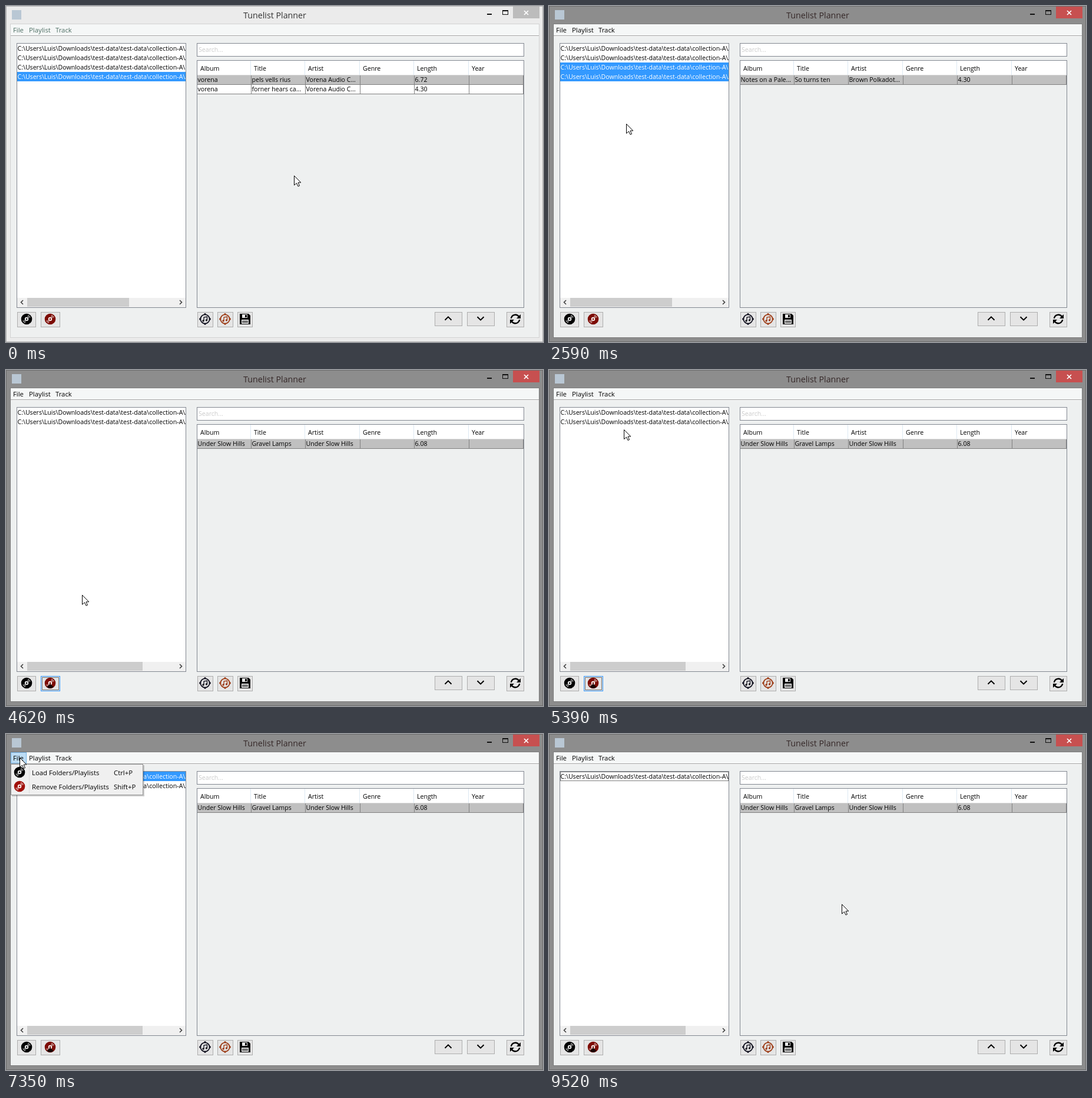
An HTML page with a canvas for the animation above (9.59 s loop, 912 px wide and 571 px high).

```html
<!DOCTYPE html>
<html lang="en">
<head>
<meta charset="utf-8">
<title>Tunelist Planner</title>
<style>
html, body { margin: 0; width: 100%; height: 100%; overflow: hidden; background: #ebebeb; }
canvas { display: block; }
</style>
</head>
<body>
<canvas id="stage" width="912" height="571"></canvas>
<script>
const ctx = document.getElementById('stage').getContext('2d');
const LOOP = 9590, STEP = 70;
const FONT = '"Open Sans", "Noto Sans", sans-serif';
const EDGE = '#828790', PANEL = '#eef0f0', BLUE = '#3399ff', RED = '#7d0c04';

// Pointer path: time, x, y
const PATH = [
  [630, 489, 288], [1610, 156, 116], [1680, 156, 116], [1820, 152, 111], [1890, 152, 111],
  [2100, 148, 104], [2450, 148, 105], [3430, 73, 533], [4410, 73, 533], [4620, 129, 382],
  [5390, 127, 101], [6020, 120, 68], [6370, 120, 68], [7000, 26, 41], [7070, 26, 41],
  [7210, 23, 40], [7490, 23, 40], [8190, 42, 85], [8680, 42, 85], [9520, 497, 289]
];
const COLS = [325, 416, 508, 601, 693, 786, 879];
const HEADS = ['Album', 'Title', 'Artist', 'Genre', 'Length', 'Year'];
const FOLDER = 'C:\\Users\\Luis\\Downloads\\test-data\\test-data\\collection-A\\';
const TABLES = [
  [['vorena', 'pels vells rius', 'Vorena Audio C...', '', '6.72'],
   ['vorena', 'forner hears ca...', 'Vorena Audio C...', '', '4.30']],
  [['Notes on a Pale...', 'So turns ten', 'Brown Polkadot...', '', '4.30']],
  [['Under Slow Hills', 'Gravel Lamps', 'Under Slow Hills', '', '6.08']]
];
const MENUS = [['File', 12, 8, 26], ['Playlist', 39, 35, 45], ['Track', 84, 80, 37]];

function rect(x, y, w, h, color) {
  ctx.fillStyle = color;
  ctx.fillRect(x, y, w, h);
}
function box(x, y, w, h, fill, edge) {
  rect(x, y, w, h, edge);
  rect(x + 1, y + 1, w - 2, h - 2, fill);
}
function text(s, x, y, color = '#000', size = 10.6) {
  ctx.font = `${size}px ${FONT}`;
  ctx.fillStyle = color;
  ctx.fillText(s, x, y);
}
function trace(points) {
  ctx.beginPath();
  points.forEach(([x, y]) => ctx.lineTo(x, y));
}
function line(points, color, width) {
  trace(points);
  ctx.strokeStyle = color;
  ctx.lineWidth = width;
  ctx.stroke();
}
function shape(points, color) {
  trace(points);
  ctx.fillStyle = color;
  ctx.fill();
}
function dot(x, y, r, color) {
  ctx.beginPath();
  ctx.arc(x, y, r, 0, 7);
  ctx.fillStyle = color;
  ctx.fill();
}
function arc(x, y, r, from, to, color, width) {
  ctx.beginPath();
  ctx.arc(x, y, r, from, to);
  ctx.strokeStyle = color;
  ctx.lineWidth = width;
  ctx.stroke();
}
function dotted(x, y, w, h) {
  ctx.setLineDash([1, 1]);
  ctx.strokeStyle = '#000';
  ctx.lineWidth = 1;
  ctx.strokeRect(x + .5, y + .5, w - 1, h - 1);
  ctx.setLineDash([]);
}

function disc(x, y, color, wedge) {
  dot(x, y, 9.3, color);
  for (const a of [-1.25, 1.9]) {
    arc(x, y, 6.8, a, a + .85, '#fff', 1);
    arc(x, y, 4.8, a, a + .85, '#fff', 1);
  }
  dot(x, y, 3.2, '#fff');
  dot(x, y, 1.5, color);
  if (wedge) shape([[x, y + 1], [x + 6, y + 7], [x, y + 9], [x - 6, y + 7]], '#180402');
}
function song(x, y, color) {
  arc(x, y, 7.7, 0, 7, color, 1.8);
  for (let i = 0; i < 4; i++) {
    const dx = Math.cos(i * Math.PI / 2), dy = Math.sin(i * Math.PI / 2);
    line([[x + dx * 7, y + dy * 7], [x + dx * 9.7, y + dy * 9.7]], color, 3);
  }
  line([[x - 2, y + 3], [x - 2, y - 3], [x + 3.5, y - 4], [x + 3.5, y + 2]], color, 1.3);
  dot(x - 3, y + 3, 1.7, color);
  dot(x + 2.5, y + 2, 1.7, color);
}
function floppy(x, y) {
  shape([[x, y], [x + 15, y], [x + 18, y + 3], [x + 18, y + 18], [x, y + 18]], '#000');
  rect(x + 4, y + 1, 9, 6, '#e8e8e8');
  rect(x + 9, y + 2, 3, 4, '#000');
  rect(x + 3, y + 10, 12, 7, '#e8e8e8');
  rect(x + 4, y + 12, 10, 1, '#000');
  rect(x + 4, y + 14, 10, 1, '#000');
}
function refresh(x, y) {
  arc(x, y, 7.3, 3.3, 5.8, '#000', 2.4);
  arc(x, y, 7.3, .15, 2.65, '#000', 2.4);
  shape([[x + 9, y - 8], [x + 9, y - 1], [x + 2, y - 1]], '#000');
  shape([[x - 9, y + 8], [x - 9, y + 1], [x - 2, y + 1]], '#000');
}
function button(x, w, h = 26, fill = '#e5e5e5', edge = '#adadad') {
  box(x, 520, w, h, fill, edge);
}
function chevron(x, y, dx, dy, color, width) {
  line([[x - dx, y + dy], [x, y - dy], [x + dx, y + dy]], color, width);
}

function pointer(t) {
  if (t <= PATH[0][0]) return PATH[0].slice(1);
  const i = PATH.findIndex(k => k[0] >= t);
  if (i < 0) return PATH[PATH.length - 1].slice(1);
  const [t0, x0, y0] = PATH[i - 1], [t1, x1, y1] = PATH[i];
  const e = Math.sin((t - t0) / (t1 - t0) * Math.PI / 2);
  return [Math.round(x0 + (x1 - x0) * e), Math.round(y0 + (y1 - y0) * e)];
}
function drawPointer(x, y) {
  const outline = [[0, 0], [0, 16], [4, 12.5], [6.5, 18], [9, 17], [6.5, 11.5], [11.3, 11.5], [0, 0]]
    .map(([dx, dy]) => [x + dx + .5, y + dy + .5]);
  shape(outline, '#fff');
  line(outline, '#000', 1);
}

function drawWindow(active) {
  rect(0, 0, 912, 571, active ? '#6c6c6c' : '#b4b4b4');
  rect(1, 1, 910, 569, active ? '#8d8d8d' : '#ebebeb');
  rect(7, 30, 899, 534, active ? '#7c7c7c' : '#d2d2d2');
  rect(8, 31, 897, 532, PANEL);
  rect(10, 7, 16, 16, '#b9c7d4');
  ctx.textAlign = 'center';
  text('Tunelist Planner', 456.5, 21, active ? '#352828' : '#333', 14.25);
  ctx.textAlign = 'left';
  rect(817, 13, 8, 2, '#111');
  box(843, 7, 10, 8, active ? '#8d8d8d' : '#ebebeb', '#111');
  rect(843, 7, 10, 2, '#111');
  rect(861, 1, 45, 20, active ? '#c75050' : '#bcbcbc');
  line([[880, 8], [887, 15]], '#fff', 1.7);
  line([[887, 8], [880, 15]], '#fff', 1.7);
}
function drawMenuBar(active, open, mx, my) {
  rect(8, 31, 897, 19, '#f5f7f7');
  rect(8, 50, 897, 1, '#a0a0a0');
  rect(8, 51, 897, 1, '#fff');
  MENUS.forEach(([name, x, left, w], i) => {
    const over = active && my < 50 && mx >= left && mx < left + w;
    if (open ? i === 0 : over) box(left, 31, w + 1, 19, open ? '#bcdcf4' : '#d5e9f8', '#74b2e4');
    text(name, x, 45, active ? '#000' : '#4e6f64', 11.35);
  });
}
function drawList(t, my) {
  const count = t < 4200 ? 4 : t < 8540 ? 2 : 1;
  const chosen = t < 2170 ? [3] : t < 4200 ? [2, 3] : t >= 6090 && t < 8540 ? [0] : [];
  box(18, 63, 288, 450, '#fff', EDGE);
  ctx.save();
  ctx.beginPath();
  ctx.rect(19, 64, 286, 432);
  ctx.clip();
  for (let i = 0; i < count; i++) {
    const y = 64 + i * 16, on = chosen.includes(i);
    if (on) rect(19, y, 286, 16, BLUE);
    text(FOLDER + (i === 2 ? 'P' : 'A'), 19.5, y + 12, on ? '#fff' : '#000');
  }
  ctx.restore();
  if (count === 1) dotted(19, 64, 286, 16);
  rect(19, 496, 286, 16, '#f0f0f0');
  const hot = t > 2520 && t < 4200 && my > 495;
  rect(36, 496, count > 2 ? 173 : 196, 15, hot ? '#b1b1b1' : '#cdcdcd');
  line([[29, 500], [25.5, 503.5], [29, 507]], '#404040', 1.6);
  line([[295, 500], [298.5, 503.5], [295, 507]], '#404040', 1.6);
}
function drawTable(rows) {
  box(324, 63, 556, 23, '#fff', EDGE);
  text('Search...', 327, 78, '#cbcbcb');
  box(324, 92, 556, 421, PANEL, EDGE);
  rect(325, 93, 554, 24, '#fff');
  rect(325, 117, 554, 1, '#d5d5d5');
  HEADS.forEach((head, i) => {
    text(head, COLS[i] + 5, 110);
    if (i) rect(COLS[i] - 1, 93, 1, 24, '#dce8f2');
  });
  rows.forEach((row, r) => {
    const y = 118 + r * 16;
    rect(325, y, 554, 15, r ? '#fff' : '#c0c0c0');
    rect(325, y + 15, 554, 1, '#808080');
    COLS.slice(1).forEach(x => rect(x === 879 ? 878 : x, y, 1, 16, '#808080'));
    row.forEach((cell, i) => text(cell, COLS[i] + (i ? 1.5 : .5), y + 11));
  });
}
function drawButtons(t, mx, my) {
  const over = t > 2520 && my >= 520 && mx >= 59 && mx < 92;
  const focused = t >= 4130 && t < 6090;
  const pressed = t >= 4060 && t < 4200;
  const edge = focused || t >= 6090 && t < 6510 ? BLUE : over ? '#7eb4ea' : '#adadad';
  button(19, 32);
  disc(35, 532, '#000');
  button(59, 33, 26, pressed ? '#c8e0f4' : over ? '#deebf6' : '#e5e5e5', edge);
  disc(75, 532, over ? '#8f1a15' : RED, t >= 4340);
  if (focused) dotted(61, 522, 29, 22);
  button(325, 27);
  song(338, 532, '#0c0c1a');
  button(359, 27);
  song(372, 532, '#9c3a14');
  button(393, 26);
  floppy(397, 523);
  button(728, 47, 24);
  chevron(751, 531, 5.5, 2.7, '#000', 2);
  button(783, 47, 24);
  chevron(806, 531, 5.5, -2.7, '#000', 2);
  button(850, 30);
  refresh(865, 532);
}
function drawPopup(my) {
  rect(10, 53, 225, 53, 'rgba(0,0,0,.2)');
  box(8, 51, 225, 53, '#f0f0f0', '#979797');
  rect(39, 54, 1, 47, '#dedede');
  if (my >= 54) box(11, my < 77 ? 53 : 77, 219, 24, '#cbe2f3', '#78b4e3');
  disc(23, 65, '#000');
  disc(23, 89, '#a01009');
  text('Load Folders/Playlists', 44, 70, '#000', 11.35);
  text('Ctrl+P', 183, 70, '#000', 11.35);
  text('Remove Folders/Playlists', 44, 94, '#000', 11.35);
  text('Shift+P', 183, 94, '#000', 11.35);
}

function draw(now) {
  const t = Math.floor(now % LOOP / STEP) * STEP;
  const [mx, my] = pointer(t);
  const active = t >= 2170, open = t >= 7350 && t < 8540;
  drawWindow(active);
  drawMenuBar(active, open, mx, my);
  drawList(t, my);
  drawTable(TABLES[t < 2310 ? 0 : t < 4200 ? 1 : 2]);
  drawButtons(t, mx, my);
  if (open) drawPopup(my);
  drawPointer(mx, my);
}
const start = performance.now();
function tick() {
  draw(performance.now() - start);
  requestAnimationFrame(tick);
}
tick();
</script>
</body>
</html>
```
